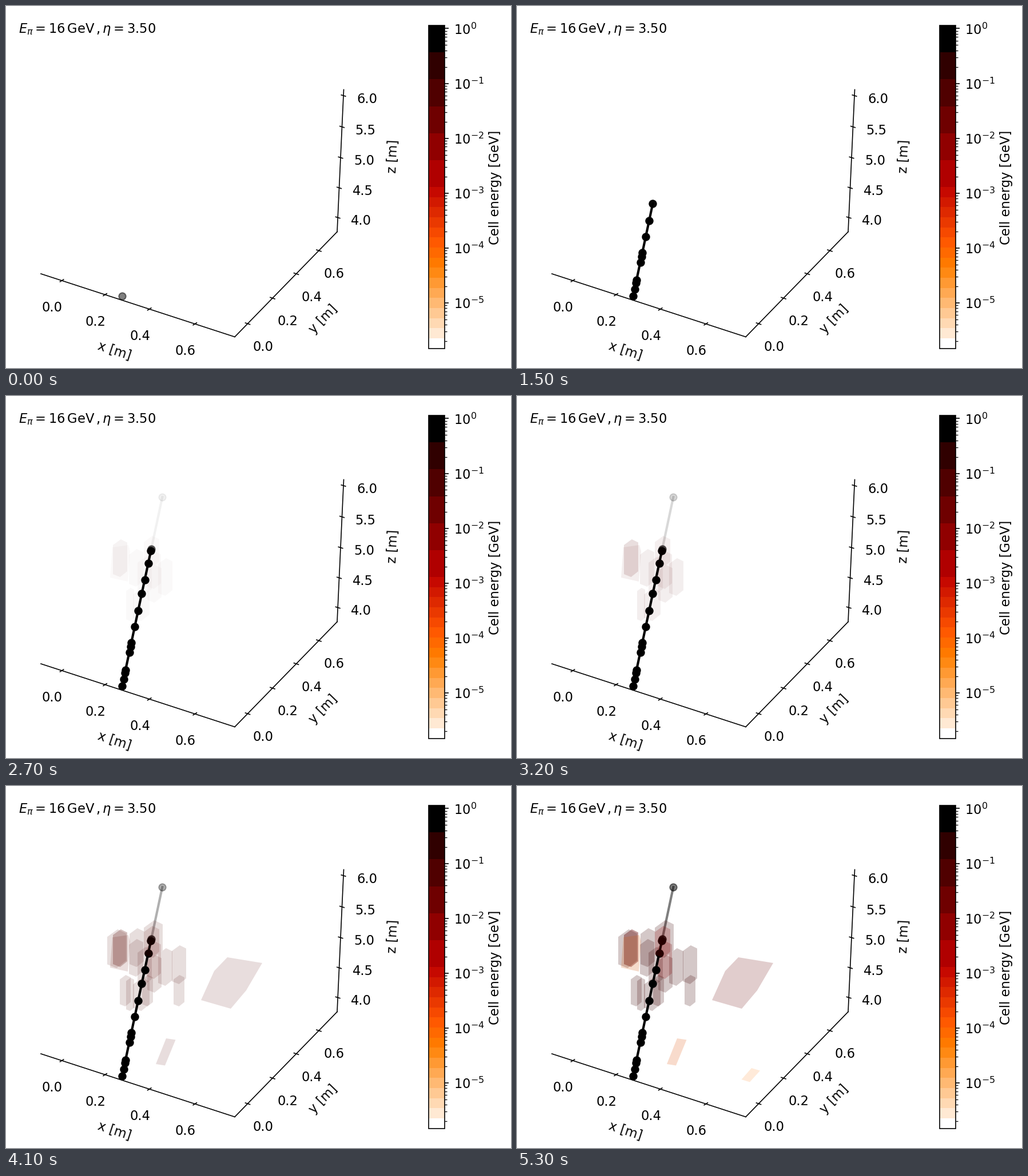
A matplotlib script that plays this animation: 883 by 634 pixels, repeating every 6.3 s.

```python
import numpy as np
import matplotlib.pyplot as plt
from matplotlib.animation import FuncAnimation
from matplotlib.patches import Polygon, Rectangle

W, H, FRAMES = 883, 634, 63
PT = 0.71                      # points per stroke unit
plt.rcParams.update({"font.family": "DejaVu Sans", "font.size": 16.3,
                     "mathtext.fontset": "dejavusans"})

fig = plt.figure(figsize=(W / 100, H / 100), dpi=100, facecolor="white")
ax = fig.add_axes([0, 0, 1, 1])
ax.set_xlim(0, W)
ax.set_ylim(H, 0)
ax.axis("off")


def line(x, y, width=1.67, **kw):
    return ax.plot(x, y, color="black", lw=width * PT, **kw)[0]


def title(x, y, s, angle):
    ax.text(x, y, s, ha="center", va="center", rotation=angle)


def axis(p, q, steps, values, stroke, shift):
    """Axis from p to q; tick spacing grows evenly to mimic perspective."""
    p, q, stroke, shift = map(np.array, (p, q, stroke, shift))
    line(*zip(p, q))
    first, gap, growth = steps
    for i, value in enumerate(values):
        at = p + (q - p) * (first + gap * i + growth * i * i)
        line(*zip(at - stroke, at + stroke), solid_capstyle="butt")
        x, y = at + shift
        ax.text(x, y + 8.3, f"{value:.1f}", ha="center", va="baseline")


# Axes
A, B, C, D = (61, 469), (400, 579.5), (579, 395.5), (590.5, 146.5)
fifths = np.arange(4) / 5
axis(A, B, (0.108, 0.2198, 0.003), fifths, (3.8, -2.4), (-16.7, 45.7))
axis(B, C, (0.1257, 0.2486, -0.0056), fifths, (4.8, 1.6), (26.8, 39.2))
axis(C, D, (0.1004, 0.2072, 0.0018), 4 + np.arange(5) / 2, (4.5, 1.4), (41, 4.6))
title(190, 604, "x [m]", -18.1)
title(554.5, 548, "y [m]", 45.8)
title(676.5, 263, "z [m]", 87.5)
ax.text(22, 47, r"$E_{\pi}=16\,\mathrm{GeV}\,,\eta=3.50$", va="baseline")

# Colour bar: wide steps above 1e-3, narrow ones below
LEFT, RIGHT, TOP, SPLIT, BOTTOM, DECADE = 739, 767, 34, 317, 599.5, 96.1
heat = plt.get_cmap("gist_heat")
edges = np.append(np.linspace(TOP, SPLIT, 7)[:-1], np.linspace(SPLIT, BOTTOM, 17))
shades = [heat((m - TOP) / (BOTTOM - TOP)) for m in (edges[:-1] + edges[1:]) / 2]
shades[0], shades[-1] = "black", "white"
for a, b, shade in zip(edges[:-1], edges[1:], shades):
    ax.add_patch(Rectangle((LEFT, a), RIGHT - LEFT, b - a, fc=shade, lw=0))
ax.add_patch(Rectangle((LEFT, TOP), RIGHT - LEFT, BOTTOM - TOP, fill=False,
                       ec="black", lw=1.67 * PT))
for e in range(6):
    y = 39.4 + DECADE * e
    line([RIGHT, RIGHT + 7.3], [y, y], solid_capstyle="butt")
    power = f"-{e}" if e else "0"
    ax.text(783, y, rf"$\mathdefault{{10^{{{power}}}}}$", va="center_baseline")
    for m in range(2, 10):
        y2 = y + DECADE * (1 - np.log10(m))
        if y2 < BOTTOM:
            line([RIGHT, RIGHT + 4.2], [y2, y2], 1.25, solid_capstyle="butt")
title(855.5, 317.5, "Cell energy [GeV]", 90)

# Straight particle track, one dot per hit
HITS = [508, 496, 485, 480, 448.5, 438.5, 432, 403.5, 376, 346, 321.5, 293, 271, 267.5]
LAST = len(HITS) - 1
dot = dict(marker="o", ms=12.5 * PT, mew=2.08 * PT, zorder=5)


def track_x(y):
    return 203 + 0.2125 * (508 - y)


def segment(y0, y1, **kw):
    return line([track_x(y0), track_x(y1)], [y0, y1], 4.2, **dot, **kw)


track = [(segment(HITS[max(i - 1, 0)], y, markevery=[1]), int(22 * (i / LAST) ** 1.05))
         for i, y in enumerate(HITS)]
tail = segment(HITS[-1], 177)

# Cell tints: early and settled colour
BROWN = (80, 8, 5), (60, 0, 0)
RED = (100, 5, 0), (140, 0, 0)
TAN = (100, 10, 0), (210, 90, 15)
PINK = (88, 0, 0), (118, 24, 26)
ORANGE = (88, 0, 0), (225, 92, 20)
PALE = (255, 162, 79), (255, 162, 79)
cells = []


def cell(points, tint, start, z=2):
    patch = ax.add_patch(Polygon(points, closed=True, lw=0, zorder=z))
    cells.append((patch, np.array(tint) / 255, start))


def prism(x, y, tint, start, w=25, h=66, z=2):
    d = 0.4 * w
    cell([(x, y + d), (x + 0.55 * w, y), (x + w, y + 0.22 * w), (x + w, y + h - d),
          (x + 0.5 * w, y + h), (x, y + h - 0.2 * w)], tint, start, z)


# Core cells light up with the decay, the shell around them follows
for x, y in [(187, 251), (215, 268), (230, 282), (247, 296), (266, 284)]:
    prism(x, y, BROWN, 26)
for x, y in [(187, 251), (246, 272)]:
    prism(x, y, RED, 26)
for x, w in [(210, 14), (222, 29)]:
    prism(x, 336, BROWN, 26, w, 58)
for i, (x, y) in enumerate([(216, 249), (177, 251), (290, 279)]):
    prism(x, y, BROWN, 33 + i, 25 + 8 * (i == 1), 68)
for i, x in enumerate([199, 238, 293]):
    prism(x, 331, BROWN, 34 + i, 19, 55)
prism(241, 235, BROWN, 33, 33, z=6)
prism(241, 245, RED, 26, 27, 56, z=6)
cell([(186, 265), (214, 261), (217, 272), (213, 325), (182, 318)], TAN, 26)
cell([(387, 300), (448, 310), (420, 358), (393, 390), (341, 375), (364, 324)], PINK, 34)
cell([(280, 442), (296.5, 444.5), (278, 489.5), (262, 487)], ORANGE, 36)
cell([(410, 494), (425, 498.5), (407, 518.5), (392.5, 514)], PALE, 49)


def draw(k):
    fade = (np.clip(k - 25, 0, 28) / 28) ** 0.85
    settled = np.clip((k - 41) / 6, 0, 1)
    for i, (part, start) in enumerate(track):
        part.set_visible(k >= start)
        overlaps = 0 if i == LAST else 4 * max(k - start, 0)
        part.set_alpha(1 - 0.5 ** (1 + overlaps))
    tail.set_visible(fade > 0)
    tail.set_alpha(0.5 * fade)
    for patch, (early, late), start in cells:
        patch.set_visible(k >= start)
        patch.set_facecolor((*(early + (late - early) * settled), 0.216 * fade))
    return []


anim = FuncAnimation(fig, draw, frames=FRAMES, interval=100, repeat=True,
                     repeat_delay=0, blit=False)
plt.show()
```
